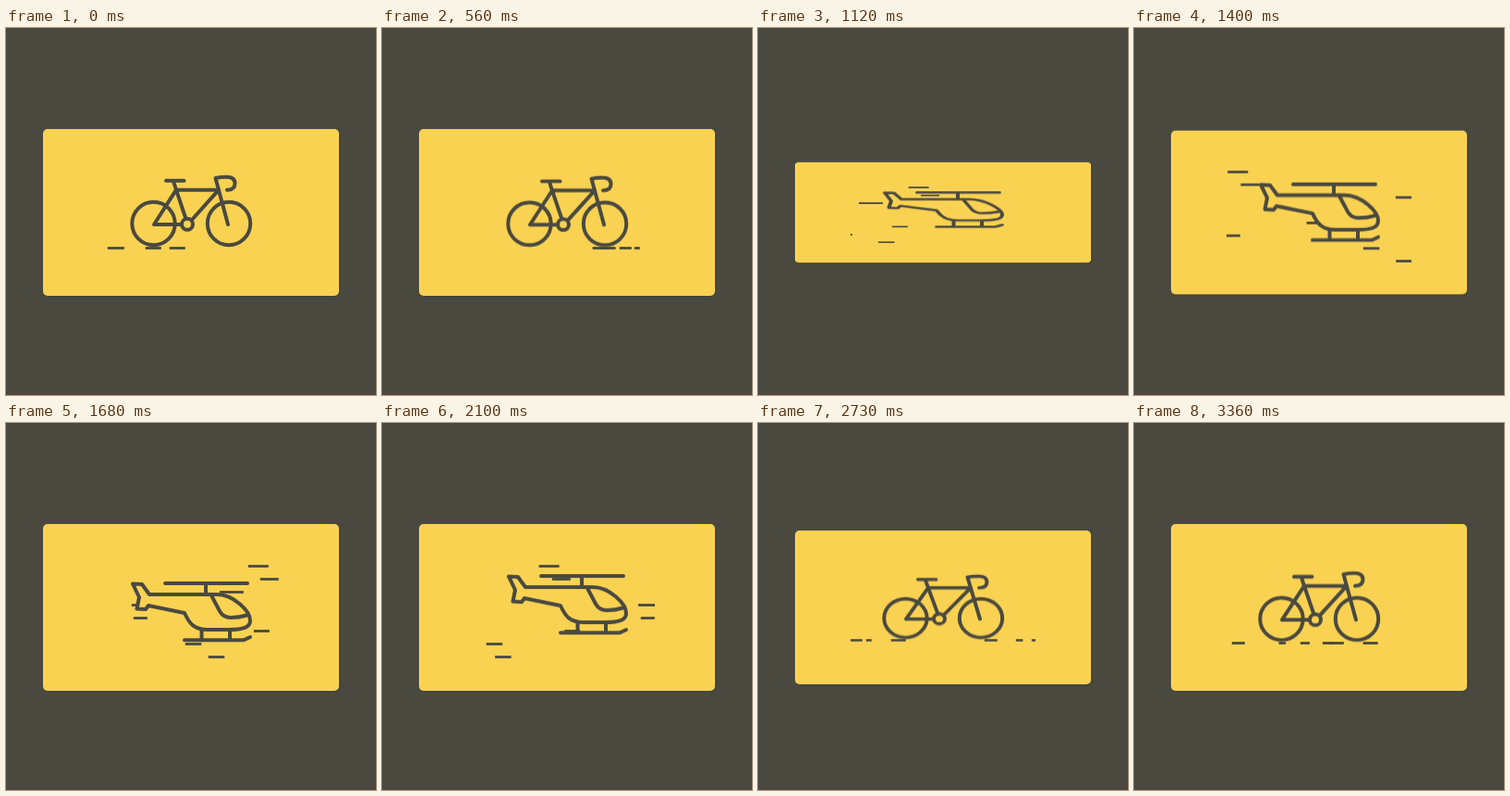
Recreate the animation shown at these times as an HTML page without scripts. Size 400 px wide and 396 px high, loop 3430 ms.

```html
<!DOCTYPE html>
<html lang="en">
<head>
<meta charset="utf-8">
<title>Flip card</title>
<style>
:root {
  --dark: #4a4940;
  --sun: #f9d252;
  --loop: 3430ms;
}
html, body {
  margin: 0;
  width: 100%;
  height: 100%;
  overflow: hidden;
  background: var(--dark);
}
.stage {
  position: relative;
  width: 400px;
  height: 396px;
  box-sizing: border-box;
  overflow: hidden;
  border-bottom: 2px solid #51463f;
}
.card {
  position: absolute;
  left: 40px;
  top: 109px;
  width: 320px;
  height: 180px;
  transform-style: preserve-3d;
  animation: flip var(--loop) linear infinite;
}
.face {
  position: absolute;
  inset: 0;
  border-radius: 5px;
  background: var(--sun);
  box-shadow: 1px 1px 2px rgba(0, 0, 0, .12);
  backface-visibility: hidden;
}
.back { transform: rotateX(180deg); }
svg { display: block; }
.art {
  fill: none;
  stroke: var(--dark);
  stroke-width: 4;
  stroke-linecap: round;
  stroke-linejoin: round;
}
.art .solid { fill: var(--sun); }

/* 704ms to 1704ms over, 2148ms to 3148ms back */
@keyframes flip {
  0% { transform: rotateX(0deg); }
  20.525% { transform: rotateX(0deg); animation-timing-function: ease; }
  49.679% { transform: rotateX(180deg); }
  62.624% { transform: rotateX(180deg); animation-timing-function: ease; }
  91.778%, 100% { transform: rotateX(360deg); }
}

.bike {
  transform-origin: 200px 236px;
  animation: squash calc(var(--loop) / 34) cubic-bezier(.37, 0, .63, 1) infinite alternate;
}
@keyframes squash {
  from { transform: scaleY(1); }
  to { transform: scaleY(.978); }
}

.heli {
  animation: hover calc(var(--loop) / 6) cubic-bezier(.37, 0, .63, 1) -23.3ms infinite alternate;
}
@keyframes hover {
  from { transform: translateY(-9.7px); }
  to { transform: translateY(0); }
}

/* Wind streaks: --x is the left end at time --t, --w the length, --v px per ms */
.wind path {
  fill: none;
  stroke: var(--dark);
  stroke-width: 2.8;
  stroke-dasharray: calc(var(--w) * 1px) 200px;
  animation: rush var(--loop) linear infinite;
}
@keyframes rush {
  from { stroke-dashoffset: calc((100 - var(--x) - var(--v) * var(--t)) * 1px); }
  to { stroke-dashoffset: calc((100 - var(--x) + var(--v) * (3430 - var(--t))) * 1px); }
}
.early { --t: 0; animation: early var(--loop) step-end infinite; }
.late { --t: 2730; animation: late var(--loop) step-end infinite; }
.air { --t: 1680; }
@keyframes early { 0% { opacity: 1; } 50%, 100% { opacity: 0; } }
@keyframes late { 0% { opacity: 0; } 50%, 100% { opacity: 1; } }
</style>
</head>
<body>
<div class="stage">
  <div class="card">
    <div class="face">
      <svg width="320" height="180" viewBox="40 109 320 180">
        <g class="wind early">
          <path d="M100 237.5H300" style="--x:110;--w:18;--v:.179"/>
          <path d="M100 237.5H300" style="--x:151;--w:17;--v:.236"/>
          <path d="M100 237.5H300" style="--x:177;--w:13;--v:.2375"/>
          <path d="M100 237.5H300" style="--x:188;--w:6;--v:.216"/>
        </g>
        <g class="wind late">
          <path d="M100 237.5H300" style="--x:245;--w:14;--v:.2206"/>
          <path d="M100 237.5H300" style="--x:279;--w:7.5;--v:.194"/>
          <path d="M100 237.5H300" style="--x:296;--w:10;--v:.184"/>
          <path d="M100 237.5H300" style="--x:90;--w:23;--v:.173"/>
          <path d="M100 237.5H300" style="--x:117;--w:6;--v:.179"/>
          <path d="M100 237.5H300" style="--x:144;--w:16;--v:.178"/>
        </g>
        <g class="art bike">
          <circle cx="159.5" cy="211" r="23.2"/>
          <circle cx="241" cy="211" r="23.2"/>
          <path d="M173 164.7H192.5M181 165.5L184 174.7L194.5 206M184 174.7L160 212H190M184 174.7H230L200.5 207.5"/>
          <path d="M240 212L226.5 162Q232 160.7 238 160.7Q247.5 160.7 247.5 167.5Q247.5 174.7 239 174.7"/>
          <circle cx="196" cy="211.8" r="6"/>
        </g>
      </svg>
    </div>
    <div class="face back">
      <svg width="320" height="180" viewBox="40 109 320 180">
        <g class="wind air">
          <path d="M100 154.5H300" style="--x:262;--w:22;--v:.2195"/>
          <path d="M100 168.5H300" style="--x:275;--w:20;--v:.2165"/>
          <path d="M100 182.5H300" style="--x:231;--w:26;--v:.186"/>
          <path d="M100 196.5H300" style="--x:136;--w:18;--v:.183"/>
          <path d="M100 210.5H300" style="--x:138;--w:15;--v:.174"/>
          <path d="M100 224.5H300" style="--x:268;--w:17;--v:.168"/>
          <path d="M100 238.5H300" style="--x:194;--w:17.5;--v:.193"/>
          <path d="M100 252.5H300" style="--x:219;--w:17.5;--v:.23"/>
        </g>
        <g class="art heli">
          <path d="M172 173H261M216 173V185M211.5 223V234M242 223V234M193 234.3H257L264 231"/>
          <path class="solid" d="M137 173.5L147 174L155 185H228C246 185 264 203 264 213C264 220 258 223 240 223H218C203 223 198 216 193 205L154 197L151 201L141.500 200.500L144 188Z"/>
          <path d="M222 186L231 203Q235 210 243 210Q252 210 260 207.500"/>
        </g>
      </svg>
    </div>
  </div>
</div>
</body>
</html>
```
